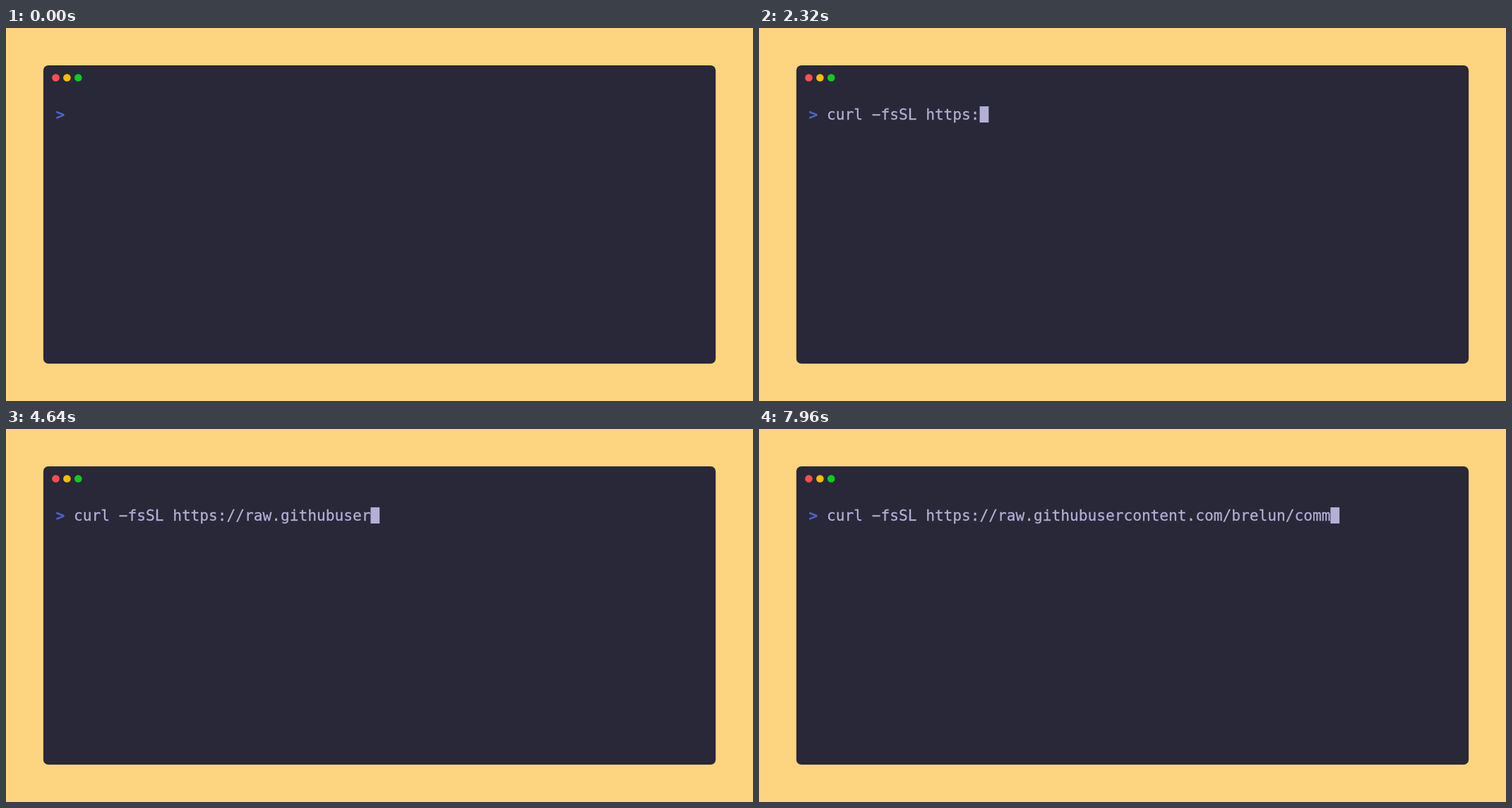
These frames come from a looping animation (1058 px wide and 529 px high, 8 s). An HTML page with a canvas:

```html
<!DOCTYPE html>
<html lang="en">
<head>
<meta charset="utf-8">
<title>Terminal typing</title>
<style>
  html, body { margin: 0; width: 100%; height: 100%; overflow: hidden; background: #fdd47f; }
  canvas { display: block; }
</style>
</head>
<body>
<canvas id="stage" width="1058" height="529"></canvas>
<script>
const ctx = document.getElementById('stage').getContext('2d');
const LOOP = 8000, TICK = 40, TICKS_PER_KEY = 18 / 5;
const WIDTH = 1200, HEIGHT = 600, MARGIN = 60, PAD = 20;
const LEFT = MARGIN + PAD, CELL = 14.449, TOP = 126, BASELINE = 147.4;
const FONT = '24px "DejaVu Sans Mono", monospace';
// A minus sign gives the wide dash of the terminal font.
const COMMAND = 'curl \u2212fsSL https://raw.githubusercontent.com/brelun/comm';

function typedCount(time) {
  const tick = Math.floor(time / TICK);
  return tick < 1 ? 0 : Math.min(COMMAND.length, Math.floor(tick / TICKS_PER_KEY) + 1);
}

function write(text, column, color, font) {
  ctx.fillStyle = ctx.strokeStyle = color;
  ctx.font = font;
  [...text].forEach((char, i) => {
    const x = LEFT + (column + i) * CELL;
    ctx.fillText(char, x, BASELINE);
    ctx.strokeText(char, x, BASELINE);
  });
}

function drawWindow() {
  ctx.fillStyle = '#fdd47f';
  ctx.fillRect(0, 0, WIDTH, HEIGHT);
  ctx.fillStyle = '#292839';
  ctx.beginPath();
  ctx.roundRect(MARGIN, MARGIN, WIDTH - 2 * MARGIN, HEIGHT - 2 * MARGIN, 8);
  ctx.fill();
  ['#ff4f4d', '#febb00', '#0fcc1d'].forEach((color, i) => {
    ctx.fillStyle = color;
    ctx.beginPath();
    ctx.arc(LEFT + 18 * i, LEFT, 6, 0, Math.PI * 2);
    ctx.fill();
  });
}

function draw(time) {
  drawWindow();
  write('>', 0, '#4c66cc', 'bold ' + FONT);
  const count = typedCount(time);
  if (!count) return;
  write(COMMAND.slice(0, count), 2, '#b3b0d6', FONT);
  ctx.fillRect(LEFT + (count + 2) * CELL, TOP, CELL, 26);
}

ctx.scale(1058 / WIDTH, 529 / HEIGHT);
ctx.lineWidth = 0.3; // slightly heavier letters
const start = performance.now();
function frame() {
  draw((performance.now() - start) % LOOP);
  requestAnimationFrame(frame);
}
frame();
</script>
</body>
</html>
```
